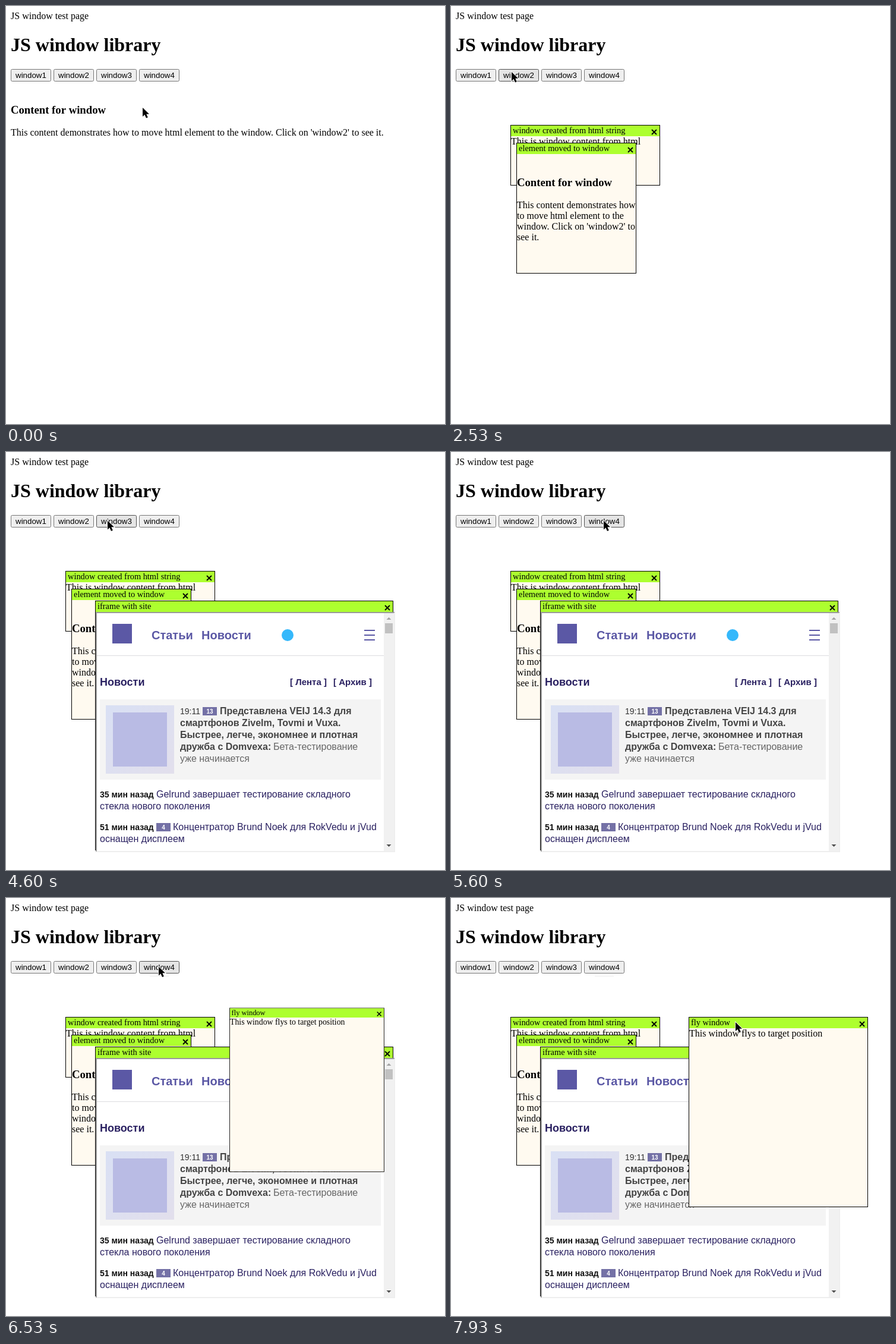
Write an HTML page with a canvas that moves like this. It is 739 by 703 pixels and loops after 8000 ms.

```html
<!DOCTYPE html>
<html lang="en">
<head>
<meta charset="utf-8">
<title>JS window test page</title>
<style>
  html, body { margin: 0; width: 100%; height: 100%; overflow: hidden; background: #fff; }
  canvas { display: block; }
</style>
</head>
<body>
<canvas id="stage" width="739" height="703"></canvas>
<script>
const ctx = document.getElementById('stage').getContext('2d');
const LOOP = 8000;
const TICK = 1000 / 15;
const SERIF = '"Liberation Serif", "Times New Roman", serif';
const SANS = '"Liberation Sans", Arial, sans-serif';
const VIOLET = '#5b58a5', INK = '#2a2161', BADGE = '#7471a6';

// Cursor way points: time, x, y
const path = [
  [0, 230, 171], [600, 37, 113],
  [1600, 37, 113], [1800, 95, 112],
  [2067, 95, 112], [2267, 102, 111],
  [3267, 102, 111], [3400, 140, 103], [3467, 162, 113],
  [3600, 162, 113], [3800, 171, 115.5],
  [4933, 171, 115.5], [5200, 264, 115.5],
  [5467, 264, 115.5], [5600, 257, 115.5],
  [7267, 257, 115.5], [7700, 445, 245], [7930, 479, 209]
];

// Button presses: from, to; each opens its window on release
const presses = [[1066, 1133], [2333, 2533], [4000, 4133], [5866, 5933]];
const PARTIAL = 4533, LOADED = 4600;
const FLY_START = 5948, FLY_TIME = 1065;

const smooth = u => u * u * (3 - 2 * u);

function cursorAt(t) {
  const i = path.findIndex(p => p[0] > t);
  if (i < 0) return path[path.length - 1].slice(1);
  const [t0, x0, y0] = path[i - 1], [t1, x1, y1] = path[i];
  const k = smooth((t - t0) / (t1 - t0));
  return [x0 + (x1 - x0) * k, y0 + (y1 - y0) * k];
}

// cubic-bezier(.25, .1, .25, 1)
function ease(x) {
  if (x <= 0) return 0;
  if (x >= 1) return 1;
  let lo = 0, hi = 1;
  for (let i = 0; i < 24; i++) {
    const u = (lo + hi) / 2;
    if (0.75 * u * (1 - u) + u ** 3 < x) lo = u; else hi = u;
  }
  return 0.3 * lo * (1 - lo) ** 2 + 3 * lo * lo * (1 - lo) + lo ** 3;
}

function rect(x, y, w, h, color) {
  ctx.fillStyle = color;
  ctx.fillRect(x, y, w, h);
}

function text(str, x, y, font, color = '#000') {
  ctx.font = font;
  ctx.fillStyle = color;
  ctx.fillText(str, x, y);
}

const serif = (str, x, y, size = 16, weight = '') =>
  text(str, x, y, `${weight} ${size}px ${SERIF}`);
const sans = (str, x, y, size, color) => text(str, x, y, `${size}px ${SANS}`, color);
const bold = (str, x, y, size, color) => text(str, x, y, `bold ${size}px ${SANS}`, color);

function poly(points, color) {
  ctx.beginPath();
  points.forEach(([x, y]) => ctx.lineTo(x, y));
  ctx.closePath();
  ctx.fillStyle = color;
  ctx.fill();
}

function button(i, state) {
  const x = 8 + i * 72;
  const [fill, edge] = {
    idle: ['#efefef', '#767676'],
    hover: ['#e5e5e5', '#4f4f4f'],
    active: ['#f5f5f5', '#8d8d8d']
  }[state];
  ctx.beginPath();
  ctx.roundRect(x + 0.5, 106.5, 67, 20, 2);
  ctx.fillStyle = fill;
  ctx.fill();
  ctx.strokeStyle = edge;
  ctx.lineWidth = 1;
  ctx.stroke();
  sans('window' + (i + 1), x + 8, 121, 13.333, '#000');
}

function pane(x, y, w, h, title) {
  rect(x, y, w, h, '#000');
  rect(x + 1, y + 1, w - 2, h - 2, '#fffaf0');
  rect(x + 1, y + 1, w - 2, 18, '#adff2f');
  serif(title, x + 4, y + 14, 14.4);
  const cx = x + w - 10, cy = y + 12, r = 4;
  ctx.beginPath();
  ctx.moveTo(cx - r, cy - r);
  ctx.lineTo(cx + r, cy + r);
  ctx.moveTo(cx + r, cy - r);
  ctx.lineTo(cx - r, cy + r);
  ctx.strokeStyle = '#000';
  ctx.lineWidth = 1.8;
  ctx.stroke();
}

function page() {
  rect(0, 0, 739, 703, '#fff');
  serif('JS window test page', 8, 22);
  serif('JS window library', 8, 76, 32, 'bold');
}

function pageContent() {
  serif('Content for window', 8, 181, 18.72, 'bold');
  serif("This content demonstrates how to move html element to the window. Click on 'window2' to see it.", 8, 218);
}

function htmlPane() {
  pane(100, 200, 252, 102, 'window created from html string');
  serif('This is window content from html', 101, 233);
}

function elementPane() {
  pane(110, 230, 202, 220, 'element moved to window');
  serif('Content for window', 111, 303, 18.72, 'bold');
  ['This content demonstrates how', 'to move html element to the',
    "window. Click on 'window2' to", 'see it.']
    .forEach((line, i) => serif(line, 111, 340 + i * 18));
}

function sitePane(t) {
  pane(150, 250, 502, 420, 'iframe with site');
  poly([[151, 269], [655, 269], [653, 271], [153, 271], [153, 671], [151, 673]], '#9a9a9a');
  poly([[655, 673], [151, 673], [153, 671], [653, 671], [653, 271], [655, 269]], '#eee');
  if (t >= PARTIAL) site(t >= LOADED);
}

function badge(x, y, str) {
  rect(x, y, 24, 14, BADGE);
  ctx.textAlign = 'center';
  bold(str, x + 12, y + 11, 10, '#fff');
  ctx.textAlign = 'left';
}

function site(loaded) {
  rect(153, 271, 500, 400, '#fff');

  rect(179, 289, 33, 33, VIOLET);
  bold('Статьи', 245, 315, 20, VIOLET);
  bold('Новости', 329, 315, 20, VIOLET);
  ctx.beginPath();
  ctx.arc(474, 308, 10, 0, 7);
  ctx.fillStyle = '#35b8fb';
  ctx.fill();
  for (let i = 0; i < 3; i++) rect(603, 299 + i * 8, 18, 2, VIOLET);
  rect(153, 342, 483, 1, '#dcdce0');

  bold('Новости', 158, 393, 18, INK);
  bold('[ Лента ]', 478, 392, 15, INK);
  bold('[ Архив ]', 551, 392, 15, INK);

  rect(158, 416, 473, 135, '#f4f4f4');
  if (loaded) picture();
  sans('19:11', 293, 441, 14, '#333');
  badge(331, 429, '13');
  bold('Представлена VEIJ 14.3 для', 360, 441, 16, '#444');
  bold('смартфонов Zivelm, Tovmi и Vuxa.', 293, 461, 16, '#444');
  bold('Быстрее, легче, экономнее и плотная', 293, 481, 16, '#444');
  bold('дружба с Domvexa:', 293, 501, 16, '#444');
  sans('Бета-тестирование', 450, 501, 16, '#666');
  sans('уже начинается', 293, 521, 16, '#666');

  bold('35 мин назад', 158, 581, 14, '#111');
  sans('Gelrund завершает тестирование складного', 253, 581, 16, INK);
  sans('стекла нового поколения', 158, 601, 16, INK);
  bold('51 мин назад', 158, 636, 14, '#111');
  badge(253, 624, '4');
  sans('Концентратор Brund Noek для RokVedu и jVud', 281, 636, 16, INK);
  sans('оснащен дисплеем', 158, 656, 16, INK);

  rect(636, 271, 17, 400, '#f1f1f1');
  rect(638, 288, 13, 17, '#c1c1c1');
  poly([[640.5, 282], [644.5, 278], [648.5, 282]], '#a3a3a3');
  poly([[640.5, 660], [648.5, 660], [644.5, 664]], '#505050');
}

function picture() {
  const tint = ctx.createLinearGradient(168, 426, 283, 541);
  tint.addColorStop(0, '#d9e0f4');
  tint.addColorStop(1, '#e2dfec');
  rect(168, 426, 115, 115, tint);
  rect(180, 438, 91, 91, '#b9bbe4');
}

function flyPane(t) {
  rect(242, 131, 32, 1, '#ededed');
  const s = 0.1 + 0.9 * ease((t - FLY_START) / FLY_TIME);
  ctx.save();
  ctx.translate(226 + 174 * s, 88 + 112 * s);
  ctx.scale(s, s);
  pane(0, 0, 302, 320, 'fly window');
  serif('This window flys to target position', 1, 33);
  ctx.restore();
}

function cursor(x, y) {
  ctx.save();
  ctx.translate(x, y);
  ctx.beginPath();
  [[0, 0], [0, 15], [3.4, 11.8], [6, 17.5], [8.8, 16.3], [6.3, 10.8], [11, 10.8]]
    .forEach(([px, py]) => ctx.lineTo(px, py));
  ctx.closePath();
  ctx.strokeStyle = '#fff';
  ctx.lineWidth = 1.6;
  ctx.stroke();
  ctx.fillStyle = '#000';
  ctx.fill();
  ctx.restore();
}

function draw(t) {
  const [x, y] = cursorAt(t);
  const open = presses.map(p => t >= p[1]);
  page();
  presses.forEach(([from, to], i) => {
    const over = y >= 106 && y < 127 && x >= 8 + i * 72 && x < 76 + i * 72;
    button(i, t >= from && t < to ? 'active' : over ? 'hover' : 'idle');
  });
  if (!open[1]) pageContent();
  [htmlPane, elementPane, sitePane, flyPane].forEach((show, i) => open[i] && show(t));
  cursor(x, y);
}

let start;
function loop(now) {
  start ??= now;
  const t = (now - start) % LOOP;
  draw(Math.min(Math.floor((t + 5) / TICK), 119) * TICK + 0.5);
  requestAnimationFrame(loop);
}
draw(0);
requestAnimationFrame(loop);
</script>
</body>
</html>
```
